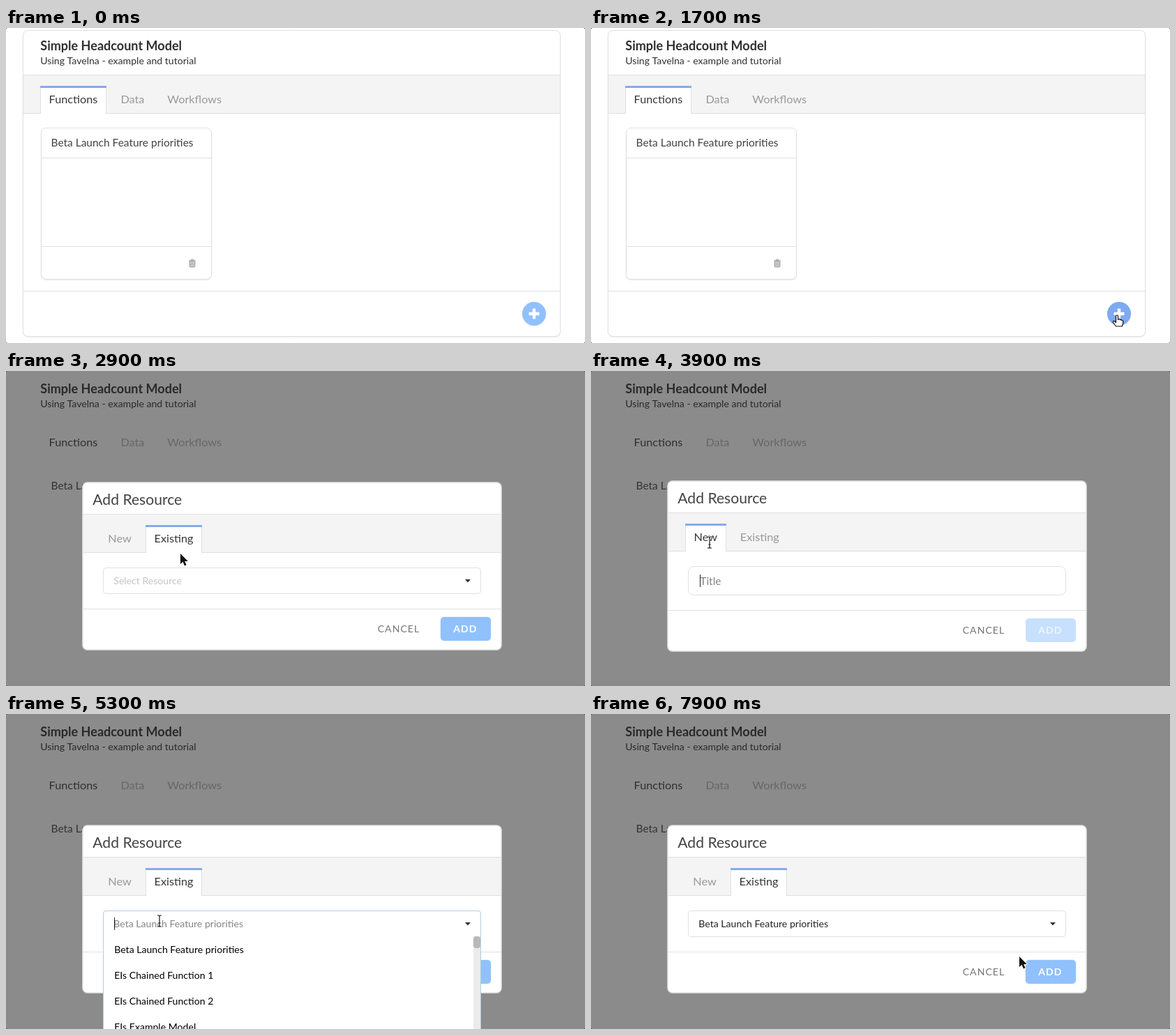
An HTML page with a canvas for the animation above (8000 ms loop, 830 px wide and 452 px high).

```html
<!DOCTYPE html>
<html lang="en">
<head>
<meta charset="utf-8">
<title>Add Resource</title>
<style>
  html, body { margin: 0; width: 100%; height: 100%; overflow: hidden; background: #fff; }
  canvas { display: block; width: 830px; height: 452px; }
</style>
</head>
<body>
<canvas id="stage"></canvas>
<script>
const W = 830, H = 452, LOOP = 8000, STEP = 100;
const canvas = document.getElementById('stage');
const ctx = canvas.getContext('2d');
const dpr = window.devicePixelRatio || 1;
canvas.width = W * dpr;
canvas.height = H * dpr;

const BLUE = '#86abe8', BUTTON = '#90c1fd', LINE = '#e0e0e0', BAND = '#f4f4f4';
const BASE = 14.08, TAB = 16.25, LARGE = 15.47;
const CHOICE = 'Beta Launch Feature priorities';
const ITEMS = [CHOICE, 'EIs Chained Function 1', 'EIs Chained Function 2', 'EIs Example Model'];

// Moments at which the interface changes
const HOVER = 900, MODAL = 1800, NEW_TAB = 3500, EXISTING_TAB = 4400, OPEN = 5200, CLOSE = 7400;

// Pointer path: time, x, y, shape
const PATH = [
  [400, 590, 270, 'arrow'], [900, 753, 404, 'arrow'],
  [1000, 756, 404, 'hand'], [1500, 756, 404, 'hand'], [1700, 754, 412, 'hand'],
  [1800, 754, 411, 'arrow'], [2100, 754, 411, 'arrow'], [2900, 250, 262, 'arrow'],
  [3200, 170, 246, 'hand'], [3500, 170, 246, 'beam'], [4000, 170, 246, 'beam'],
  [4200, 232, 246, 'hand'], [4700, 232, 246, 'hand'], [5000, 220, 297, 'beam'],
  [5800, 220, 297, 'beam'], [5900, 224, 322, 'hand'], [6300, 238, 425, 'hand'],
  [6700, 222, 330, 'hand'], [7000, 213, 312, 'beam'], [7200, 214, 338, 'hand'],
  [7500, 214, 338, 'arrow'], [7900, 614, 348, 'arrow']
];

const ARROW = new Path2D('M0 0V15L3.5 11.8 6 17.4 8.6 16.3 6.2 10.9H10.8Z');
const HAND = new Path2D('M-1.5 1.5a1.5 1.5 0 0 1 3 0v5l1-.6a1.3 1.3 0 0 1 2 .9 ' +
  '1.3 1.3 0 0 1 2.2.8 1.2 1.2 0 0 1 2 1v3.4l-1.5 4H-1.5L-5.5 10.5a1.4 1.4 0 0 1 1.6-2l2.4 2z');
const BEAM = new Path2D('M-3-8H-1.5Q0-8 0-6.5V6.5Q0 8-1.5 8H-3M3-8H1.5Q0-8 0-6.5M0 6.5Q0 8 1.5 8H3M-1.5 3H1.5');

function rect(x, y, w, h, color) {
  ctx.fillStyle = color;
  ctx.fillRect(x, y, w, h);
}

function box(x, y, w, h, r, fill, stroke) {
  ctx.beginPath();
  ctx.roundRect(x, y, w, h, r);
  if (fill) {
    ctx.fillStyle = fill;
    ctx.fill();
  }
  if (stroke) {
    ctx.shadowColor = 'transparent';
    ctx.lineWidth = 1;
    ctx.strokeStyle = stroke;
    ctx.stroke();
  }
}

function shadowed(color, blur, dy, draw) {
  ctx.save();
  ctx.shadowColor = color;
  ctx.shadowBlur = blur * dpr;
  ctx.shadowOffsetY = dy * dpr;
  draw();
  ctx.restore();
}

function text(label, x, y, size, color, weight = 400, spacing = 0) {
  ctx.font = `${weight} ${size}px Lato, sans-serif`;
  ctx.letterSpacing = spacing + 'px';
  ctx.fillStyle = color;
  ctx.fillText(label, x, y);
}

function tab(label, x, y, active) {
  if (active) {
    ctx.font = `400 ${TAB}px Lato, sans-serif`;
    ctx.letterSpacing = '0px';
    const left = Math.round(x - 12.5);
    const w = Math.round(ctx.measureText(label).width + 25.5);
    rect(left, y - 25, w, 40, LINE);
    rect(left + 1, y - 25, w - 2, 40, '#fff');
    rect(left, y - 25, w, 3, BLUE);
  }
  text(label, x, y, TAB, active ? '#383838' : '#999');
}

function headings(title, functions, muted, card) {
  text('Simple Headcount Model', 49.3, 32, 18.06, title, 700);
  text('Using Tavelna - example and tutorial', 49.3, 52, BASE, title);
  if (muted) {
    text('Functions', 61.6, 108, TAB, functions);
    text('Data', 164.4, 108, TAB, muted);
    text('Workflows', 231.3, 108, TAB, muted);
  }
  text(CHOICE, 64.5, 170, LARGE, card);
}

function trash(x, y) {
  rect(x - 5, y - 4, 10, 1, '#999');
  box(x - 2, y - 5.5, 4, 2, 1, null, '#999');
  box(x - 3.9, y - 2.8, 7.8, 8.3, 1, '#d4d4d4', '#999');
  for (let i = -1; i < 2; i++) rect(x + i * 2 - 0.4, y - 1, 0.8, 5, '#a4a4a4');
}

function page(t) {
  rect(0, 0, W, H, '#fff');
  shadowed('rgba(0,0,0,.13)', 2, 1, () => box(24.5, 3.5, 770, 439, 7, '#fff', LINE));
  rect(25, 67, 769, 56, LINE);
  rect(25, 68, 769, 54, BAND);
  rect(25, 377, 769, 1, LINE);
  tab('Functions', 61.6, 108, true);
  tab('Data', 164.4, 108, false);
  tab('Workflows', 231.3, 108, false);

  shadowed('rgba(0,0,0,.14)', 2, 1, () => box(50.5, 143.5, 244, 217, 7, '#fff', LINE));
  rect(51, 186, 243, 1, LINE);
  rect(51, 313, 243, 1, LINE);
  headings('#303030', null, null, '#424242');
  trash(267, 337.5);

  shadowed('rgba(0,0,0,.1)', 2, 1, () =>
    box(740, 393, 34, 34, 17, t >= HOVER ? '#7daaf1' : BUTTON));
  box(749.5, 407.8, 15, 4.4, 1, '#fff');
  box(754.8, 402.5, 4.4, 15, 1, '#fff');
}

function caret(x, t, start) {
  if (Math.floor((t - start) / 500) % 2 === 0) rect(x, 292, 1, 18, '#222');
}

function chevron() {
  ctx.fillStyle = '#333';
  ctx.beginPath();
  ctx.moveTo(658, 299);
  ctx.lineTo(666, 299);
  ctx.lineTo(662, 303.5);
  ctx.fill();
}

function dropdown(t) {
  box(139.5, 282.5, 541, 190, 4, '#fff', '#b4cdd9');
  text(CHOICE, 154.3, 306, BASE, '#858585');
  caret(155, t, OPEN);
  chevron();
  rect(670, 319, 10, 133, '#ebebeb');
  box(670, 319, 10, 17, 4, '#b9b9b9');
  ITEMS.forEach((item, i) => text(item, 155.2, 343 + i * 37, BASE, '#000'));
}

function modal(t) {
  const isNew = t >= NEW_TAB && t < EXISTING_TAB;
  const grow = isNew ? 2 : 0;
  const top = 160 - grow;
  const shift = isNew ? 1.2 : 0;

  rect(0, 0, W, H, '#8b8b8b');
  headings('#292929', '#303030', '#676767', '#333');

  box(109, top - 1, 602, 242 + 2 * grow, 8, '#d2d2d2');
  box(110.5, top + 0.5, 599, 239 + 2 * grow, 6, '#fff');
  rect(111, top + 45, 598, 56, LINE);
  rect(111, top + 46, 598, 54, BAND);
  text('Add Resource', 124.3, top + 31.5, 21.12, '#424242');
  tab('New', 146.3 + shift, top + 86, isNew);
  tab('Existing', 212.6 + shift, top + 86, !isNew);
  rect(111, 341 + grow, 598, 1, LINE);

  if (isNew) {
    box(139.5, 280.5, 541, 41, 8, '#fff', LINE);
    text('Title', 156.3, 307, LARGE, '#858585');
    caret(156, t, NEW_TAB);
  } else {
    const chosen = t >= CLOSE;
    box(139.5, 282.5, 541, 37, 4, '#fff', LINE);
    text(chosen ? CHOICE : 'Select Resource', 154.3, 306, BASE, chosen ? '#222' : '#c4c4c4');
    chevron();
  }

  text('CANCEL', 532.7, 375 + grow, BASE, '#757575', 400, 1);
  shadowed(isNew ? 'transparent' : 'rgba(110,150,200,.35)', 2, 0, () =>
    box(623, 353 + grow, 72, 34, 5, isNew ? '#c7e0fe' : BUTTON));
  text('ADD', 641.3, 375 + grow, BASE, isNew ? '#eef6ff' : '#fff', 700, 1);

  if (t >= OPEN && t < CLOSE) dropdown(t);
}

function pointer(t) {
  if (t < PATH[0][0]) return;
  let i = PATH.length - 1;
  while (PATH[i][0] > t) i--;
  const a = PATH[i], b = PATH[i + 1] || a;
  const p = (t - a[0]) / (b[0] - a[0] || 1);
  const e = p * p * (3 - 2 * p);
  ctx.save();
  ctx.translate(a[1] + (b[1] - a[1]) * e, a[2] + (b[2] - a[2]) * e);
  ctx.lineJoin = 'round';
  if (a[3] === 'hand') {
    ctx.fillStyle = '#fff';
    ctx.strokeStyle = '#111';
    ctx.lineWidth = 1.2;
    ctx.fill(HAND);
    ctx.stroke(HAND);
  } else {
    const shape = a[3] === 'beam' ? BEAM : ARROW;
    ctx.strokeStyle = '#fff';
    ctx.lineWidth = a[3] === 'beam' ? 2.6 : 2;
    ctx.stroke(shape);
    ctx.fillStyle = ctx.strokeStyle = '#111';
    ctx.lineWidth = 1.2;
    if (a[3] === 'beam') ctx.stroke(shape);
    else ctx.fill(shape);
  }
  ctx.restore();
}

// Rounded window corners
function corners() {
  ctx.fillStyle = '#555';
  for (const [x, y] of [[0, 0], [W, 0], [0, H], [W, H]]) {
    const sx = x ? -1 : 1, sy = y ? -1 : 1;
    ctx.beginPath();
    ctx.moveTo(x, y);
    ctx.lineTo(x + 2.5 * sx, y);
    ctx.quadraticCurveTo(x, y, x, y + 2.5 * sy);
    ctx.fill();
  }
}

const start = performance.now();

function frame() {
  const t = Math.floor(((performance.now() - start) % LOOP) / STEP) * STEP;
  ctx.setTransform(dpr, 0, 0, dpr, 0, 0);
  if (t < MODAL) page(t);
  else modal(t);
  corners();
  pointer(t);
  requestAnimationFrame(frame);
}
frame();
</script>
</body>
</html>
```
